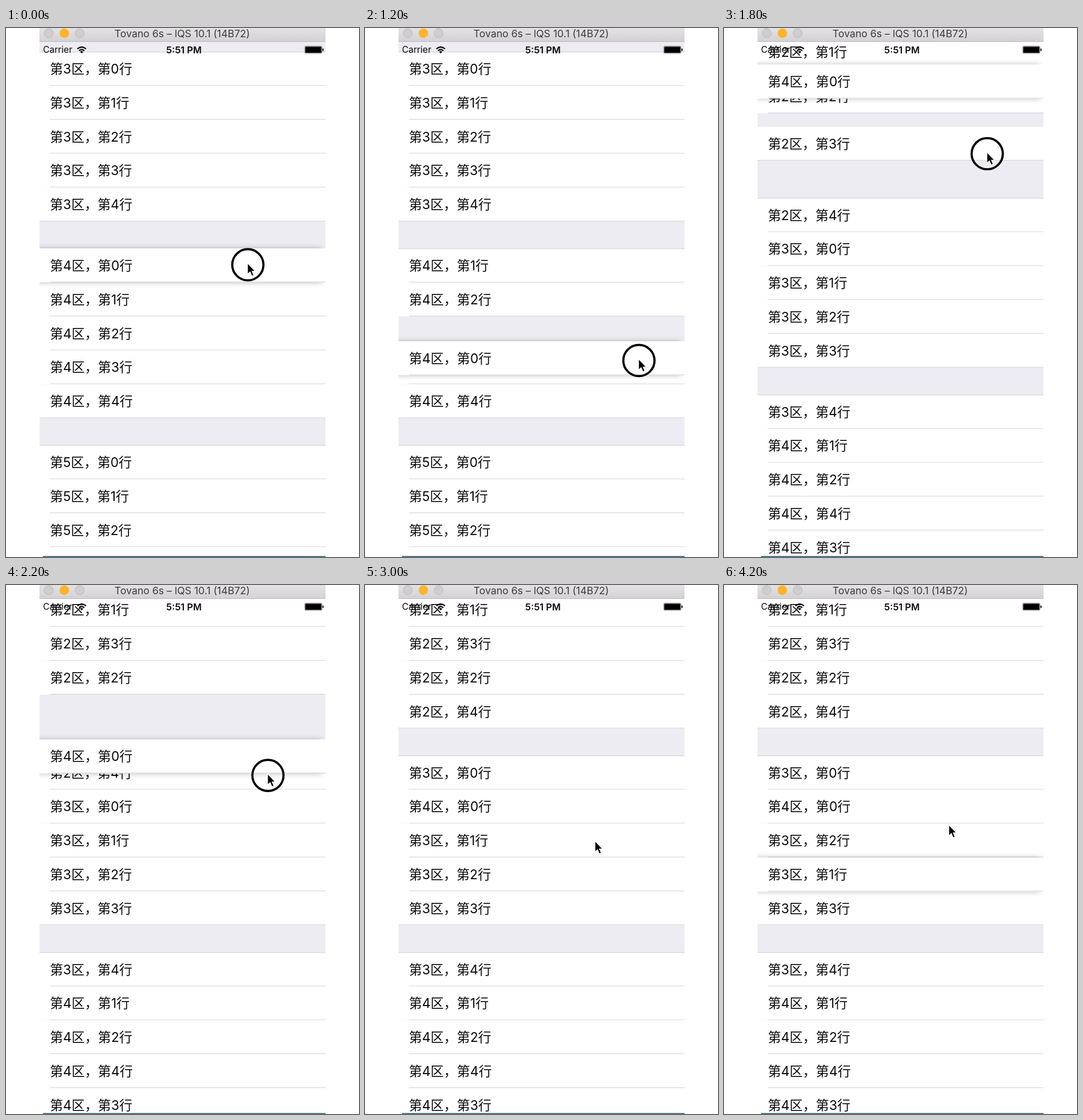
An HTML page that plays this animation: 611x917 px, repeating every 4400 ms.

```html
<!DOCTYPE html>
<html lang="zh-CN">
<head>
<meta charset="utf-8">
<title>Row reordering</title>
<style>
html, body { margin: 0; width: 100%; height: 100%; overflow: hidden; background: #fff; }
svg { display: block; width: 611px; height: 917px; }
text { font-family: Inter, "Noto Sans CJK SC", "Noto Sans CJK", sans-serif; fill: #0a0a0a; }
.row text { font-size: 22.8px; }
.row line { stroke: #d9d8dc; stroke-width: 1.4; }
</style>
</head>
<body>
<svg viewBox="0 0 611 917">
  <defs>
    <clipPath id="screen"><rect x="58" y="0" width="495" height="917"/></clipPath>
    <linearGradient id="bar" x2="0" y2="1">
      <stop offset="0" stop-color="#e4e2e4"/><stop offset="1" stop-color="#d3d1d3"/>
    </linearGradient>
    <filter id="shadow" filterUnits="userSpaceOnUse" x="30" y="-25" width="550" height="110">
      <feDropShadow dx="-6.6" dy="0" stdDeviation="4.8" flood-color="#000" flood-opacity="0.27"/>
    </filter>
  </defs>
  <g clip-path="url(#screen)">
    <rect x="58" width="495" height="917" fill="#eeecf3"/>
    <g id="table"></g>
  </g>
  <g id="status">
    <text x="64" y="43.3" font-size="15.5">Carrier</text>
    <path d="M123.5 36.2Q131 29.8 138.5 36.2M126.4 39.4Q131 35.4 135.6 39.4" fill="none" stroke="#0a0a0a" stroke-width="2.2"/>
    <path d="M128.2 41.2Q131 39 133.8 41.2L131 44Z"/>
    <text x="308" y="43.6" font-size="16.2" font-weight="600" text-anchor="middle">5:51 PM</text>
    <rect x="517" y="31.5" width="30" height="12.5" rx="2" fill="none" stroke="#777"/>
    <rect x="518" y="32.5" width="28" height="10.5" rx="1"/>
    <rect x="547.8" y="35.5" width="1.8" height="4.5" rx="0.9"/>
  </g>
  <g id="titlebar">
    <rect x="58" width="495" height="24" fill="url(#bar)"/>
    <rect x="58" y="23" width="495" height="1" fill="#b9b7b9"/>
    <g fill="#cfcdcf" stroke="#bab8ba">
      <circle cx="74" cy="9" r="7.8"/>
      <circle cx="101" cy="9" r="8.2" fill="#fdb32d" stroke="none"/>
      <circle cx="127.5" cy="9" r="7.8"/>
    </g>
    <text x="305" y="16" font-size="17.5" text-anchor="middle" style="fill:#3c3a3c">Tovano 6s – lQS 10.1 (14B72)</text>
  </g>
  <rect x="64" y="915.4" width="489" height="1.6" fill="#2a647f"/>
  <g id="pointer">
    <circle id="ring" cx="0.6" cy="0.4" r="27" fill="none" stroke="#000" stroke-width="3.8"/>
    <path d="M0 -2.5V17L4.4 12.9L7.6 20.1L11 18.6L7.9 11.6H13.4Z" fill="#000" stroke="#fff" stroke-width="1.3"/>
  </g>
</svg>
<script>
const STEP = 200, STEPS = 22, ROW = 58.75, SECTION = 341, FIRST = 2;
const DROP = 14, PICK = 16, RELEASE = 20;
const $ = id => document.getElementById(id);
const table = $('table');

// key poses: step, pointer x, pointer y, top of the lifted row
const path = [
  [0, 418, 410, 382], [4, 458.5, 286, 251.5], [6, 473.5, 576, 543], [7, 476, 632, 606],
  [8, 462, 92, 62], [9, 455, 217.5, 63.5], [12, 452, 369, 339.3], [15, 398, 446, 414],
  [18, 364, 493, 464.5], [21, 389, 418, 472.5]
];

const move = (list, from, to) => list.splice(to, 0, list.splice(from, 1)[0]);
const swap = (list, a, b) => { [list[a], list[b]] = [list[b], list[a]]; };

// step, row, new slot, how it gets there, share of the slide its neighbour has left
const edits = [
  [4, '40', 8, move], [5, '40', 10, move], [6, '40', 12, move], [7, '40', 14, swap],
  [8, '40', 6, move], [9, '40', 2, move, 0.7], [10, '40', 4, swap], [12, '40', 6, move, 0.25],
  [18, '31', 8, move]
];

const smooth = p => p * p * (3 - 2 * p);
const scrollAt = k => 254.5 * (1 - (1 - Math.min(1, Math.max(0, (k - 7) / 3))) ** 5);

function poseAt(k) {
  const i = path.findIndex(p => p[0] >= k);
  const b = path[i], a = path[i - 1] || b;
  const p = a === b ? 0 : smooth((k - a[0]) / (b[0] - a[0]));
  return a.slice(1).map((v, n) => v + (b[n + 1] - v) * p);
}

function makeRow(key) {
  const g = document.createElementNS('http://www.w3.org/2000/svg', 'g');
  g.setAttribute('class', 'row');
  g.innerHTML = `<rect x="58" width="495" height="${ROW}" fill="#fff"/>
    <line class="top" x1="58" x2="553"/>
    <line class="bottom" x1="76" x2="553" y1="${ROW - 0.6}" y2="${ROW - 0.6}"/>
    <text x="76" y="37.7">第${key[0]}区，第${key[1]}行</text>`;
  return g;
}

const keys = Array.from({ length: 20 }, (_, i) => `${FIRST + Math.floor(i / 5)}${i % 5}`);
const rows = Object.fromEntries(keys.map(key => [key, makeRow(key)]));

function place(g, y, slot, lifted) {
  g.setAttribute('transform', `translate(0 ${y})`);
  g.querySelector('.top').style.display = slot === 0 && !lifted ? '' : 'none';
  g.querySelector('.bottom').setAttribute('x1', slot === 4 && !lifted ? 58 : 76);
  if (lifted) g.setAttribute('filter', 'url(#shadow)');
  else g.removeAttribute('filter');
  table.append(g);
}

// Order of the rows at step k, and how far each one is from its slot
function layoutAt(k) {
  const order = keys.slice(), shift = {};
  for (const [at, key, to, edit, left = 0] of edits) {
    if (at > k) break;
    const from = order.indexOf(key), dir = Math.sign(to - from);
    edit(order, from, to);
    if (at < k) continue;
    for (let i = to - dir, rest = left; rest > 0; i -= dir, rest -= 0.4) {
      shift[order[i]] = dir * rest * ROW;
    }
  }
  return { order, shift };
}

function draw(k) {
  const [x, y, top] = poseAt(k);
  const lifted = k < DROP ? '40' : k >= PICK ? '31' : '';
  const { order, shift } = layoutAt(k);
  const start = 41.5 - SECTION + scrollAt(k);
  order.forEach((key, i) => {
    const home = start + Math.floor(i / 5) * SECTION + i % 5 * ROW;
    if (key !== lifted) place(rows[key], home + (shift[key] || 0), i % 5, false);
  });
  if (lifted) place(rows[lifted], top, 0, true);
  $('pointer').setAttribute('transform', `translate(${x} ${y})`);
  $('ring').style.display = lifted && k < RELEASE ? '' : 'none';
}

let shown = -1;
const begin = performance.now();
function tick() {
  const k = Math.floor((performance.now() - begin) / STEP) % STEPS;
  if (k !== shown) draw(shown = k);
  requestAnimationFrame(tick);
}
tick();
</script>
</body>
</html>
```
